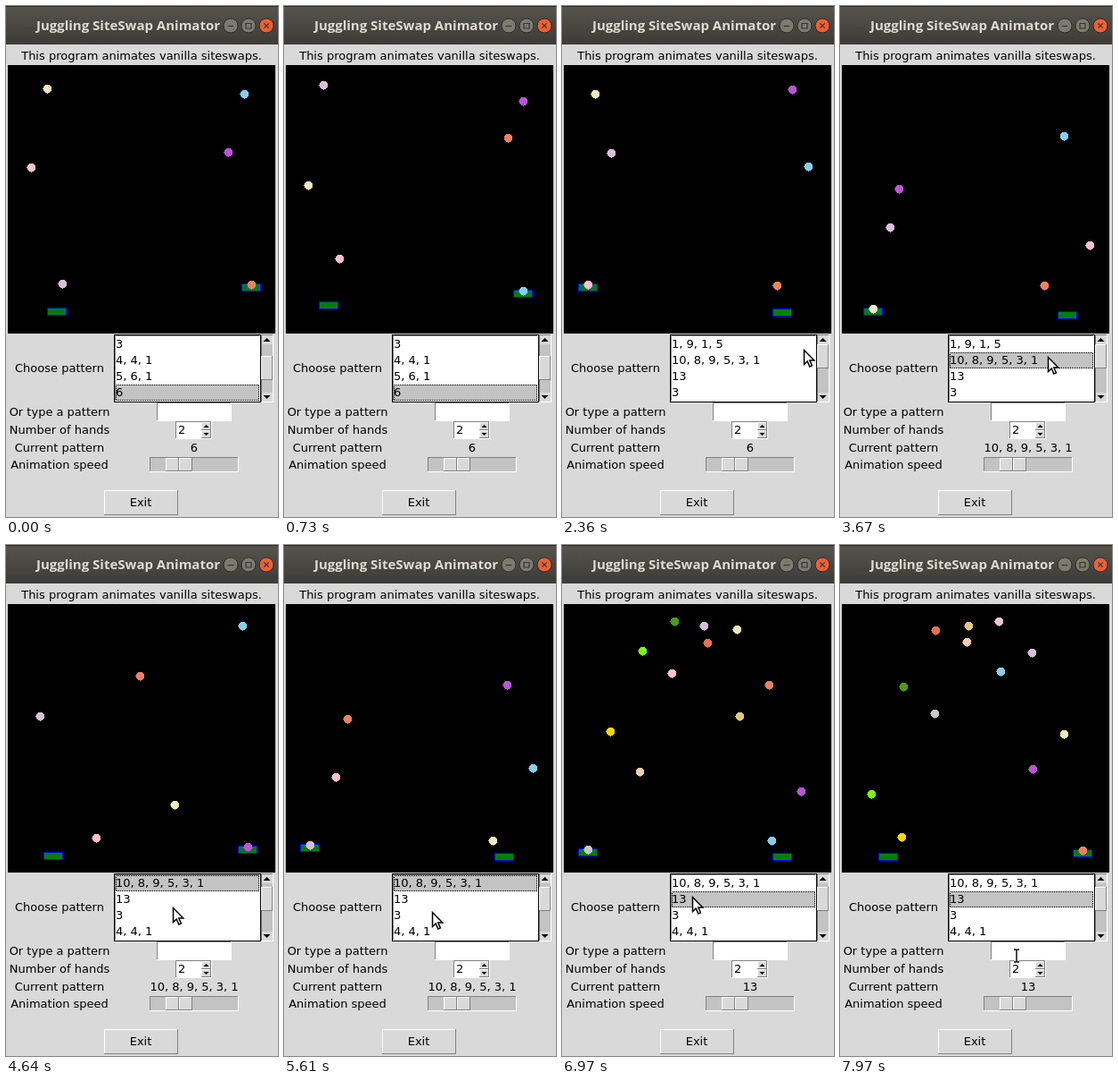
An HTML page for the animation above (8 s loop, 305 by 571 pixels).

```html
<!DOCTYPE html>
<html lang="en">
<head>
<meta charset="utf-8">
<title>Juggling SiteSwap Animator</title>
<style>
  html, body { margin: 0; width: 100%; height: 100%; overflow: hidden; background: #d9d9d9; }
  svg, #labels { position: absolute; left: 0; top: 0; width: 305px; height: 571px; overflow: hidden; }
  #labels div { position: absolute; font: 13px/15px "DejaVu Sans", sans-serif; color: #000; white-space: pre; }
  #labels .mid { width: 280px; margin-left: -140px; text-align: center; }
  #labels .title { font: bold 15px/15px "Open Sans", sans-serif; color: #dfdbd2; }
  rect, #balls circle { shape-rendering: crispEdges; }
</style>
</head>
<body>
<svg id="stage" viewBox="0 0 305 571"></svg>
<div id="labels"></div>
<svg id="pointer" viewBox="0 0 305 571"></svg>
<script>
const LOOP = 8000;
const el = id => document.getElementById(id);

// ---------- window and widgets ----------
const rect = (x, y, w, h, fill, extra = '') =>
  `<rect x="${x}" y="${y}" width="${w}" height="${h}" fill="${fill}" ${extra}/>`;
const bevel = (x, y, w, h, fill, sunken) => {
  const [lit, dark] = sunken ? ['#828282', '#fff'] : ['#fff', '#828282'];
  return rect(x, y, w, h, dark) + rect(x, y, w - 1, h - 1, lit) +
    rect(x + 1, y + 1, w - 2, h - 2, fill, 'class="face"');
};
const triangle = (x, y, r, dir) =>
  `<path d="M${x - r} ${y + dir * r / 2}h${2 * r}l${-r} ${-dir * r}z"/>`;
const titleButton = (x, fill, mark) =>
  `<circle cx="${x}" cy="22" r="8" fill="${fill}" stroke="#2f2e2a"/>
   <path d="${mark}" fill="none" stroke="#35342f" stroke-width="1.2"/>`;
const label = (x, baseline, str, cls = 'mid', id = '') =>
  `<div class="${cls}" id="${id}" style="left:${x}px;top:${baseline - 12}px">${str}</div>`;

const patterns = ['1, 9, 1, 5', '10, 8, 9, 5, 3, 1', '13', '3', '4, 4, 1', '5, 6, 1', '6'];
const rows = [0, 1, 2, 3];
const captions = [['Choose pattern', 409], ['Or type a pattern', 458], ['Number of hands', 478],
  ['Current pattern', 498], ['Animation speed', 517]];

el('stage').innerHTML = `
  <defs><linearGradient id="bar" x2="0" y2="1">
    <stop stop-color="#56544d"/><stop offset="1" stop-color="#3c3b37"/></linearGradient></defs>
  ${rect(0, 0, 305, 571, '#d9d9d9')}
  ${rect(0, 0, 305, 43, 'url(#bar)')}
  ${rect(0, 0, 305, 1, '#2b2a27')}
  ${titleButton(252, '#7d7a71', 'M248.500 22.500h7')}
  ${titleButton(272, '#7d7a71', 'M269 19.500h6v5.500h-6z')}
  ${titleButton(292, '#ee5f33', 'M289.300 19.300l5.400 5.400m0-5.400l-5.400 5.400')}
  ${rect(2, 66, 300, 300, '#000')}
  <g id="hands">${[0, 1].map(() =>
    rect(-10.5, -4.5, 21, 8, '#008000', 'stroke="#00f"')).join('')}</g>
  <g id="balls">${'<circle cx=".5" cy=".5" r="5"/>'.repeat(13)}</g>
  ${rect(121, 367, 165, 76, '#000')}${bevel(122, 368, 163, 74, '#fff', true)}
  <g id="pick">${rect(123, 0, 161, 18, '#c3c3c3')}
    ${rect(123.5, .5, 160, 17, 'none', 'stroke="#000" stroke-dasharray="1 1"')}</g>
  ${bevel(286, 367, 14, 76, '#c3c3c3', true)}
  ${rect(287, 368, 12, 10, '#d9d9d9')}${rect(287, 432, 12, 10, '#d9d9d9')}
  ${triangle(292.5, 373, 4, 1)}${triangle(292.5, 437, 4, -1)}
  <g id="thumb">${bevel(286, 0, 13, 27, '#d9d9d9')}</g>
  ${bevel(169, 443, 84, 21, '#fff', true)}
  ${bevel(190, 464, 41, 20, '#fff', true)}
  ${bevel(219, 465, 11, 9, '#d9d9d9')}${bevel(219, 474, 11, 9, '#d9d9d9')}
  ${triangle(224.5, 469.5, 3, 1)}${triangle(224.5, 478.5, 3, -1)}
  ${bevel(161, 504, 100, 17, '#c3c3c3', true)}
  ${bevel(179, 505, 15, 15, '#d9d9d9')}${bevel(194, 505, 15, 15, '#d9d9d9')}
  ${bevel(110, 541, 83, 28, '#d9d9d9')}`;

el('labels').innerHTML = `
  ${label(137, 26, 'Juggling SiteSwap Animator', 'title mid')}
  ${label(152, 60, 'This program animates vanilla siteswaps.')}
  ${captions.map(([str, y]) => label(60, y, str)).join('')}
  ${rows.map(i => label(123, 382 + 18 * i, '', '', 'row' + i)).join('')}
  ${label(193, 478, '2', '')}
  ${label(211, 498, '', 'mid', 'current')}
  ${label(151, 559, 'Exit')}`;

const beamPath = 'M-3-7h2l1 1 1-1h2M0-6v12M-3 7h2l1-1 1 1h2';
el('pointer').innerHTML = `
  <path id="arrow" d="M.500 .500v16l3.700-3.500 2.600 6 2.600-1.100-2.600-5.800h5z"
    fill="#fff" stroke="#000" stroke-width="1.5"/>
  <g id="beam" fill="none"><path d="${beamPath}" stroke="#fff" stroke-width="3"/>
    <path d="${beamPath}" stroke="#000" stroke-width="1.4"/></g>`;

const place = (node, x, y) => node.setAttribute('transform', `translate(${x} ${y})`);
const show = (node, on) => node.setAttribute('visibility', on ? 'visible' : 'hidden');

// ---------- juggling ----------
const color = {
  cream: '#f2e8bf', sky: '#87ceeb', orchid: '#ba55d3', pink: '#ffc0cb', thistle: '#d8bfd8',
  coral: '#e9835c', peach: '#f3cfae', khaki: '#e6c87c', tomato: '#e8704c', green: '#4c9a12',
  lime: '#7cfc00', gold: '#ffd700', gray: '#c8c8c8'
};

// beat: ms per beat; at/phase: beat count at a time; gravity in px per beat squared;
// even: hand throwing on even beats (0 left, 1 right); balls: beat of a known throw
const acts = [
  { from: 0, pick: 6, throws: [6], beat: 337.5, at: 0, phase: .185, even: 0, gravity: 38.2,
    throwY: 350.5, catchY: 307,
    balls: { thistle: 0, orchid: -1, cream: -2, sky: -3, pink: -4, coral: -5 } },
  { from: 3360, pick: 1, throws: [10, 8, 9, 5, 3, 1], beat: 334, at: 3670, phase: 2.36, even: 1,
    gravity: 12.65, throwY: 351.5, catchY: 337,
    balls: { thistle: 1, sky: 0, coral: -3, orchid: -4, cream: -5, pink: -6 } },
  { from: 6920, pick: 2, throws: [13], beat: 328, at: 6970, phase: .19, even: 1, gravity: 7.16,
    throwY: 350.5, catchY: 343,
    balls: { sky: 0, peach: -1, khaki: -2, pink: -3, tomato: -4, thistle: -5, green: -6,
      cream: -7, lime: -8, coral: -9, gold: -10, orchid: -11, gray: -12 } }
];
const THROW_X = 65, CATCH_X = 21, GRIP = 4;
const mod = (n, m) => ((n % m) + m) % m;
const mix = (a, b, k) => a + (b - a) * k;
const mirror = (x, hand) => hand ? 304 - x : x;

// Each hand moves straight between its throw point and its catch point.
function handAt(act, hand, beat) {
  const k = mod(beat + (hand === act.even ? 0 : 1), 2);
  const reach = k < 1 ? k : 2 - k;
  return [mirror(mix(THROW_X, CATCH_X, reach), hand), mix(act.throwY, act.catchY, reach)];
}

function ballAt(act, start, beat) {
  const height = b => act.throws[mod(b, act.throws.length)];
  const handOf = b => mod(b + act.even, 2);
  let b = start;
  while (b + height(b) <= beat) b += height(b);
  const flight = height(b) - 1, age = beat - b, target = handOf(b + height(b));
  if (age >= flight) {
    const [x, y] = handAt(act, target, beat);
    return [x, y - GRIP];
  }
  const k = age / flight;
  return [mix(mirror(THROW_X, handOf(b)), mirror(CATCH_X, target), k),
    mix(act.throwY, act.catchY, k) - GRIP - act.gravity * age * (flight - age)];
}

// ---------- pointer and list ----------
const pointerPath = [[1200, 301, 553], [1450, 291, 407], [1730, 291, 406], [2080, 290, 386],
  [2360, 271, 384], [2600, 268, 386], [3250, 233, 392], [4250, 233, 392], [4800, 175, 408],
  [5400, 166, 410], [6000, 166, 410], [6600, 146, 393], [7350, 146, 393], [7900, 198, 459], [8000, 198, 459]];
const scrollSteps = [[0, 3], [1820, 2], [1920, 1], [2020, 0], [4600, 1]];
const thumbY = [378, 382, 387, 391];

function pointerAt(t) {
  const i = pointerPath.findIndex(p => p[0] > t);
  const [t0, x0, y0] = pointerPath[i - 1], [t1, x1, y1] = pointerPath[i];
  const k = (t - t0) / (t1 - t0), ease = k * k * (3 - 2 * k);
  return [Math.round(mix(x0, x1, ease)), Math.round(mix(y0, y1, ease))];
}
const latest = (list, test) => list.filter(test).pop();

function draw(t) {
  const act = latest(acts, a => a.from <= t);
  const clock = t > 730 && t < 910 ? 730 : t;   // brief stall
  const beat = act.phase + (clock - act.at) / act.beat;

  [...el('hands').children].forEach((node, hand) =>
    place(node, ...handAt(act, hand, beat).map(Math.round)));
  const names = Object.keys(act.balls);
  [...el('balls').children].forEach((node, i) => {
    const name = names[i];
    show(node, name);
    if (!name) return;
    node.setAttribute('fill', color[name]);
    place(node, ...ballAt(act, act.balls[name], beat).map(Math.round));
  });

  const top = latest(scrollSteps, s => s[0] <= t)[1];
  rows.forEach(i => { el('row' + i).textContent = patterns[top + i]; });
  const row = act.pick - top;
  show(el('pick'), row >= 0 && row < 4);
  place(el('pick'), 0, 369 + 18 * row);
  place(el('thumb'), 0, thumbY[top]);
  el('current').textContent = patterns[act.pick];

  const seen = t >= pointerPath[0][0];
  const [x, y] = seen ? pointerAt(t) : [0, 0];
  const typing = seen && y > 444 && x > 168 && x < 253;
  const hovering = x >= 286 && y < 420;
  el('thumb').querySelector('.face').setAttribute('fill', seen && hovering ? '#ececec' : '#d9d9d9');
  show(el('arrow'), seen && !typing);
  show(el('beam'), typing);
  place(el('arrow'), x, y);
  place(el('beam'), x, y);
}

const began = performance.now();
function tick() {
  draw((performance.now() - began) % LOOP);
  requestAnimationFrame(tick);
}
tick();
</script>
</body>
</html>
```
